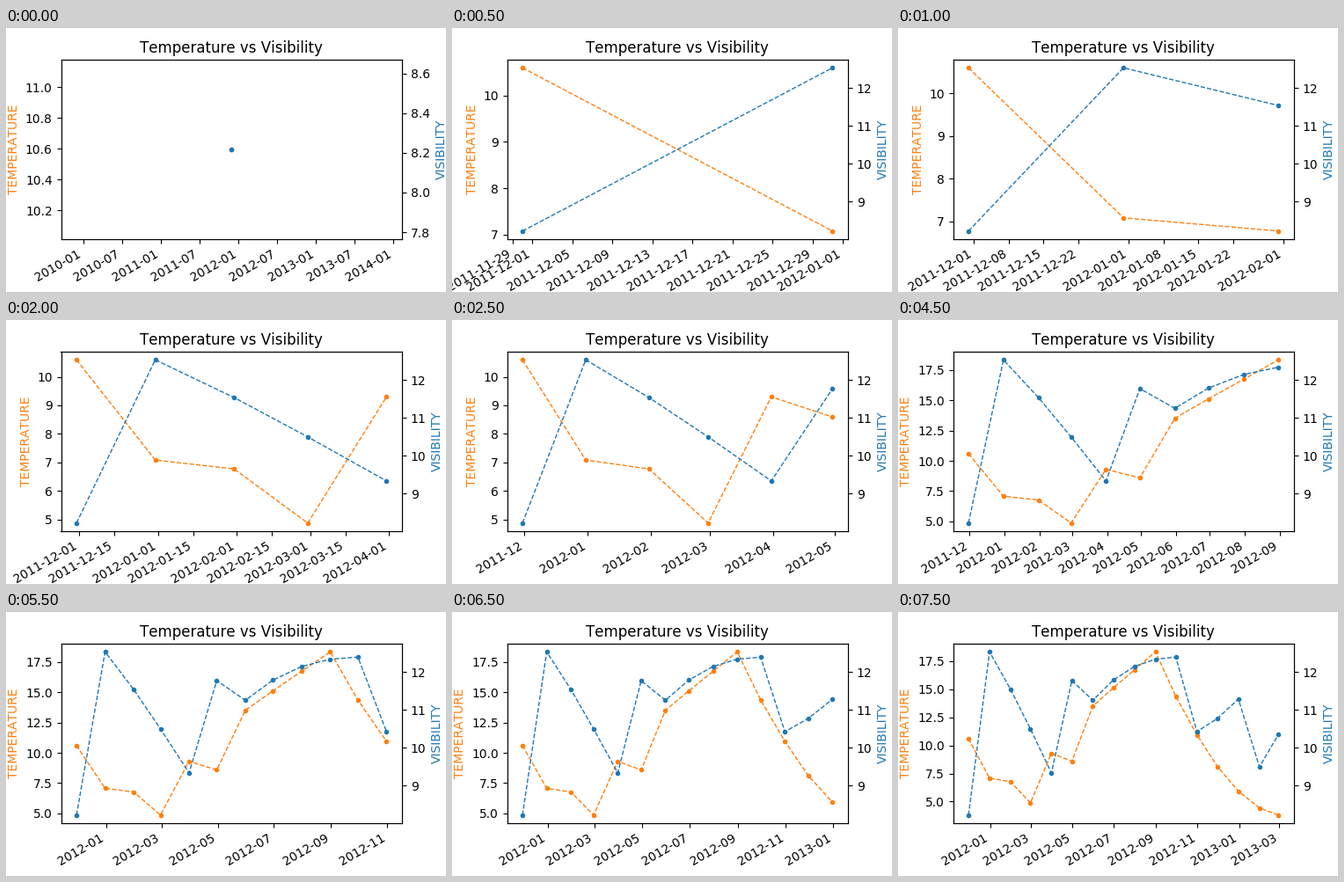
A matplotlib script for the animation above (8000 ms loop, 500x300 px).

```python
import matplotlib.pyplot as plt
import numpy as np
from matplotlib.animation import FuncAnimation


def trace(start, *legs):
    """Monthly values along legs of (end value, months, ease-out power)."""
    values = [start]
    for end, steps, power in legs:
        begin = values[-1]
        for step in range(1, steps + 1):
            eased = 1 - (1 - step / steps) ** power
            values.append(begin + (end - begin) * eased)
    return np.array(values)


def hop(value):
    return value, 1, 1


temperature = trace(10.597, hop(7.08), hop(6.77), hop(4.87), hop(9.30),
                    hop(8.59), hop(13.51), (18.33, 3, 1), (3.80, 6, 1.75))
visibility = trace(8.217, hop(12.53), (9.33, 3, 0.92), hop(11.77), hop(11.25),
                   (12.39, 4, 2.2), hop(10.42), (11.28, 2, 0.75),
                   hop(9.49), hop(10.35))

# Each value is stamped on the last day of its month
months = np.arange("2011-12", "2013-04", dtype="datetime64[M]")
dates = months.astype("datetime64[D]") - np.timedelta64(1, "D")

plt.rcParams["font.family"] = "DejaVu Sans"
plt.rcParams["text.kerning_factor"] = 6
fig, ax_temp = plt.subplots(figsize=(5, 3), dpi=100)
ax_vis = ax_temp.twinx()
ax_temp.set_title("Temperature vs Visibility")


def add_series(ax, values, label, color):
    ax.set_ylabel(label, color=color)
    line, = ax.plot(dates, values, color=color, linestyle="--",
                    linewidth=1, marker=".")
    return ax, line, values


series = [
    add_series(ax_temp, temperature, "TEMPERATURE", "tab:orange"),
    add_series(ax_vis, visibility, "VISIBILITY", "tab:blue"),
]


def update(frame):
    count = frame + 1
    for ax, line, values in series:
        line.set_data(dates[:count], values[:count])
        ax.relim()
    for ax, _, _ in series:
        ax.autoscale_view()
    fig.autofmt_xdate()
    return [line for _, line, _ in series]


anim = FuncAnimation(fig, update, frames=len(dates), interval=500,
                     init_func=lambda: update(0), repeat=True, repeat_delay=0)
plt.show()
```
